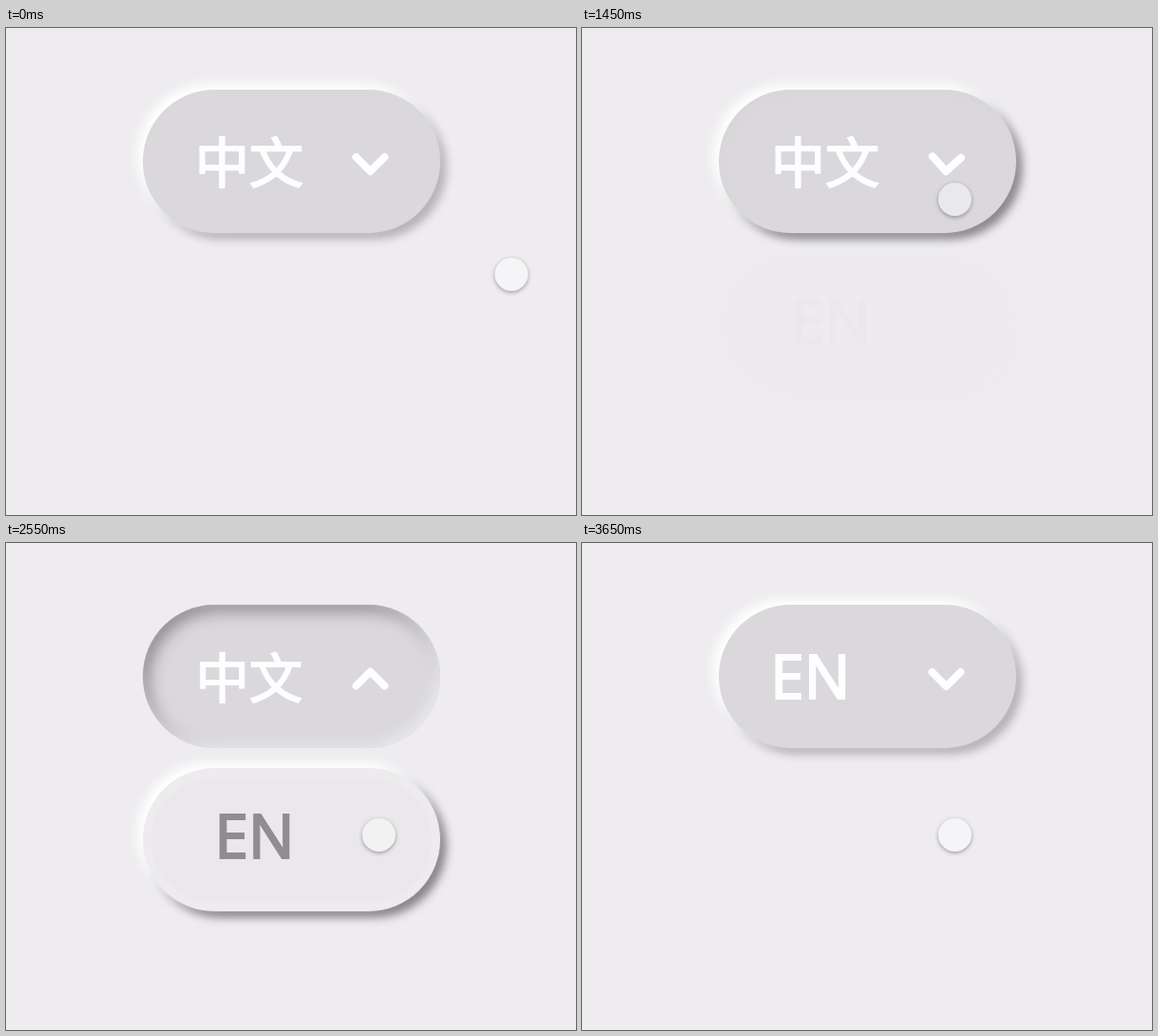
Recreate the animation shown at these times as an HTML page. Size 600 by 513 pixels, loop 4050 ms.

```html
<!DOCTYPE html>
<html lang="en">
<head>
<meta charset="utf-8">
<title>Language menu</title>
<style>
  html, body { margin: 0; width: 100%; height: 100%; overflow: hidden; background: #eeecef; }
  .pill, #hold, #cursor, svg { position: absolute; }
  .pill { left: 143.5px; width: 313.5px; height: 151px; border-radius: 76px; }
  #head { top: 65px; background: #dad8db; }
  #option { top: 237px; background: #edebee; }
  #hold { inset: 9.5px; border-radius: 66px; background: #d2d0d3; }
  #cursor { left: -17.5px; top: -17.5px; width: 35px; height: 35px; border-radius: 50%; }
  svg { left: 0; top: 0; width: 600px; height: 513px; }
  /* A thin outline gives the medium weight between regular and bold. */
  .light { fill: #fefdff; stroke: #fefdff; }
  .dark { fill: #8f8d90; stroke: #8f8d90; }
  .latin { font: 400 64px "Noto Sans", "Open Sans", sans-serif; stroke-width: 1.9px; }
  .han { font: 400 57px "Noto Sans CJK SC", "Noto Sans CJK", sans-serif; stroke-width: 1.9px; }
</style>
</head>
<body>
<div id="head" class="pill"></div>
<div id="option" class="pill"><div id="hold"></div></div>
<svg viewBox="0 0 600 513">
  <text id="chinese" class="han light" x="199" y="163">中文</text>
  <text id="english" class="latin light" x="198.2" y="164.3">EN</text>
  <text id="choice" class="latin dark" x="219.5" y="332.3">EN</text>
  <path id="chevron" d="M368.5 136l15 15 15-15" fill="none" stroke="#fefdff"
        stroke-width="8" stroke-linecap="round" stroke-linejoin="round"/>
</svg>
<div id="cursor"></div>
<script>
  const LOOP = 4050;
  const $ = id => document.getElementById(id);
  const [head, option, hold, chinese, english, choice, chevron, cursor] =
    ["head", "option", "hold", "chinese", "english", "choice", "chevron", "cursor"].map($);

  const linear = (t, from, to) => Math.min(1, Math.max(0, (t - from) / (to - from)));
  const ease = (t, from, to) => {
    const p = linear(t, from, to);
    return p < .5 ? 2 * p * p : 1 - 2 * (1 - p) ** 2;
  };
  const mix = (a, b, p) => a + (b - a) * p;

  // A raised pill casts a highlight and a shadow; a sunken one is shaded inside.
  function shade(pill, raised, hover) {
    const sunk = 1 - raised;
    pill.style.boxShadow = [
      `-6px -6px 11px rgba(255,255,255,${raised})`,
      `6.5px 6.5px 10px rgba(60,56,62,${raised * mix(.32, .58, hover)})`,
      `inset -5px -5px 14px rgba(240,238,241,${sunk * .9})`,
      `inset 5px 6px 17px rgba(70,67,72,${sunk * .58})`
    ].join();
  }

  function render(t) {
    const opened = ease(t, 1425, 1700), closed = ease(t, 3425, 3650);
    const open = opened - closed;
    const arrive = ease(t, 175, 700), descend = ease(t, 2275, 2550);
    const press = linear(t, 2650, 2750) - linear(t, 3225, 3300);

    shade(head, 1 - open, ease(t, 450, 700) - opened);
    shade(option, 1, ease(t, 2350, 2550) - linear(t, 2650, 2750));
    option.style.opacity = choice.style.opacity = open;
    hold.style.opacity = linear(t, 2450, 3250);

    chinese.style.opacity = 1 - closed;
    english.style.opacity = closed;
    const size = 1 - .015 * opened;
    chinese.setAttribute("transform", `translate(258 141) scale(${size}) translate(-258 -141)`);
    chevron.setAttribute("transform", `rotate(${180 * open} 383.5 143.25)`);

    const x = mix(531.5, 392, arrive), y = mix(259, 180, arrive) + 127 * descend;
    cursor.style.transform = `translate(${x}px, ${y}px)`;
    cursor.style.background =
      `radial-gradient(circle, rgba(255,255,255,${mix(.42, 0, press)}), rgba(255,255,255,${mix(.42, .3, press)}) 70%)`;
    cursor.style.boxShadow = `0 1.5px 4px rgba(60,56,62,${mix(.45, .3, press)})`;
  }

  function frame() {
    render(performance.now() % LOOP);
    requestAnimationFrame(frame);
  }
  frame();
</script>
</body>
</html>
```
